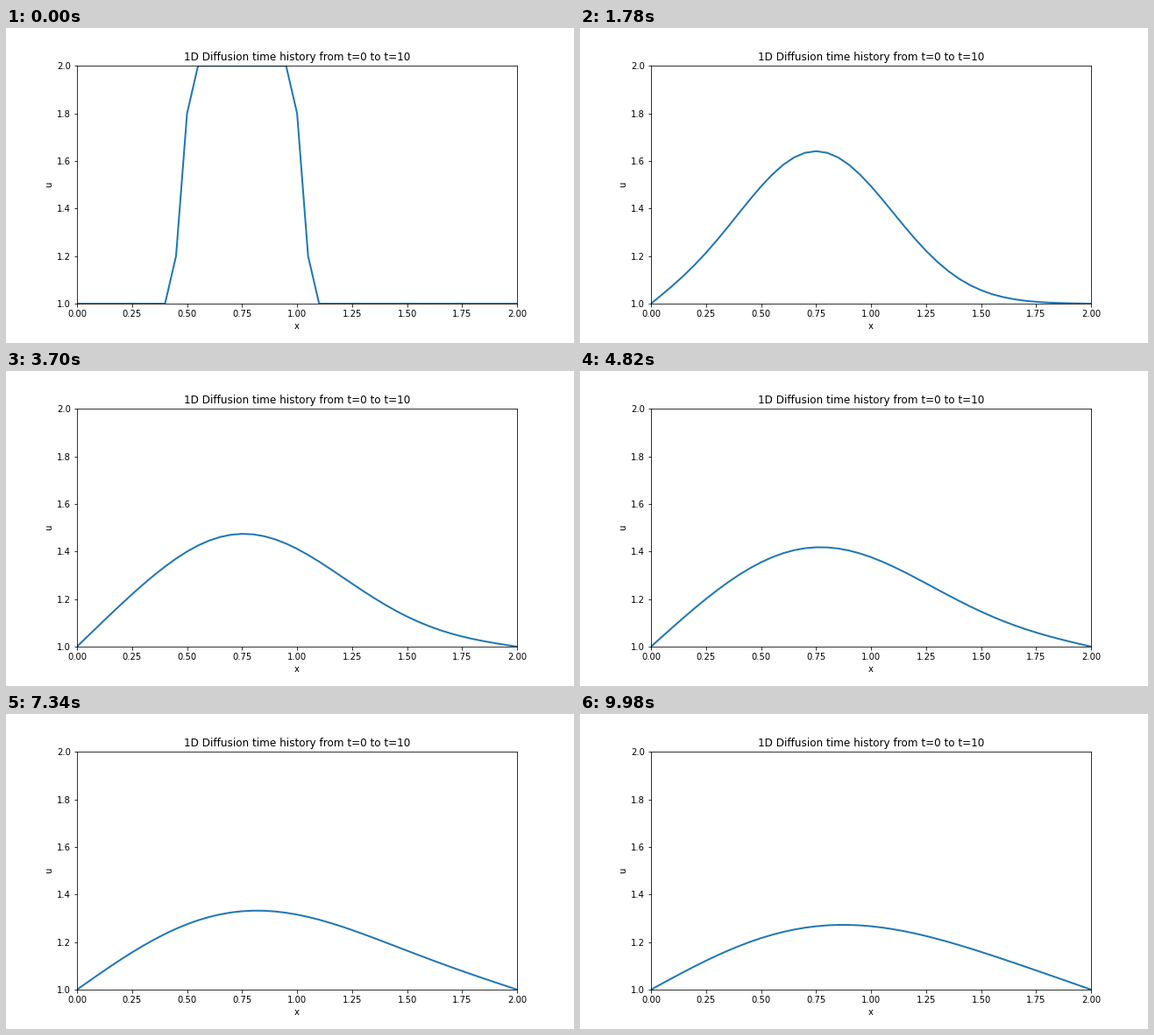
A matplotlib script for the animation above (10000 ms loop, 648 px wide and 360 px high).

```python
import numpy as np
import matplotlib.pyplot as plt
from matplotlib.animation import FuncAnimation

FRAMES, INTERVAL = 500, 20
NX, SIGMA = 41, 0.2  # grid points, diffusion number nu*dt/dx^2


def diffuse(u):
    """One explicit step with both ends held fixed."""
    out = u.copy()
    out[1:-1] += SIGMA * (u[2:] - 2 * u[1:-1] + u[:-2])
    return out


def solve(steps):
    """Time history of a square pulse, starting after the first step."""
    u = np.ones(NX)
    u[10:21] = 2  # pulse on 0.5 <= x <= 1
    history = []
    for _ in range(steps):
        u = diffuse(u)
        history.append(u)
    return history


x = np.linspace(0, 2, NX)
history = solve(FRAMES)

plt.rcParams.update({"font.family": "DejaVu Sans", "font.size": 10})
fig = plt.figure(figsize=(9, 5), dpi=72, facecolor="white")
fig.subplots_adjust(left=0.125, right=0.9, bottom=0.125, top=0.88)
ax = fig.add_subplot(xlim=(0, 2), ylim=(1, 2), xlabel="x", ylabel="u")
ax.set_xticks(np.linspace(0, 2, 9))
ax.set_yticks(np.linspace(1, 2, 6))
ax.set_title("1D Diffusion time history from t=0 to t=10", y=1.0)
line, = ax.plot(x, history[0], lw=2, color="#1f77b4")


def update(i):
    line.set_ydata(history[i])
    return line,


anim = FuncAnimation(fig, update, frames=FRAMES, interval=INTERVAL,
                     repeat=True, repeat_delay=0, blit=True)
plt.show()
```
